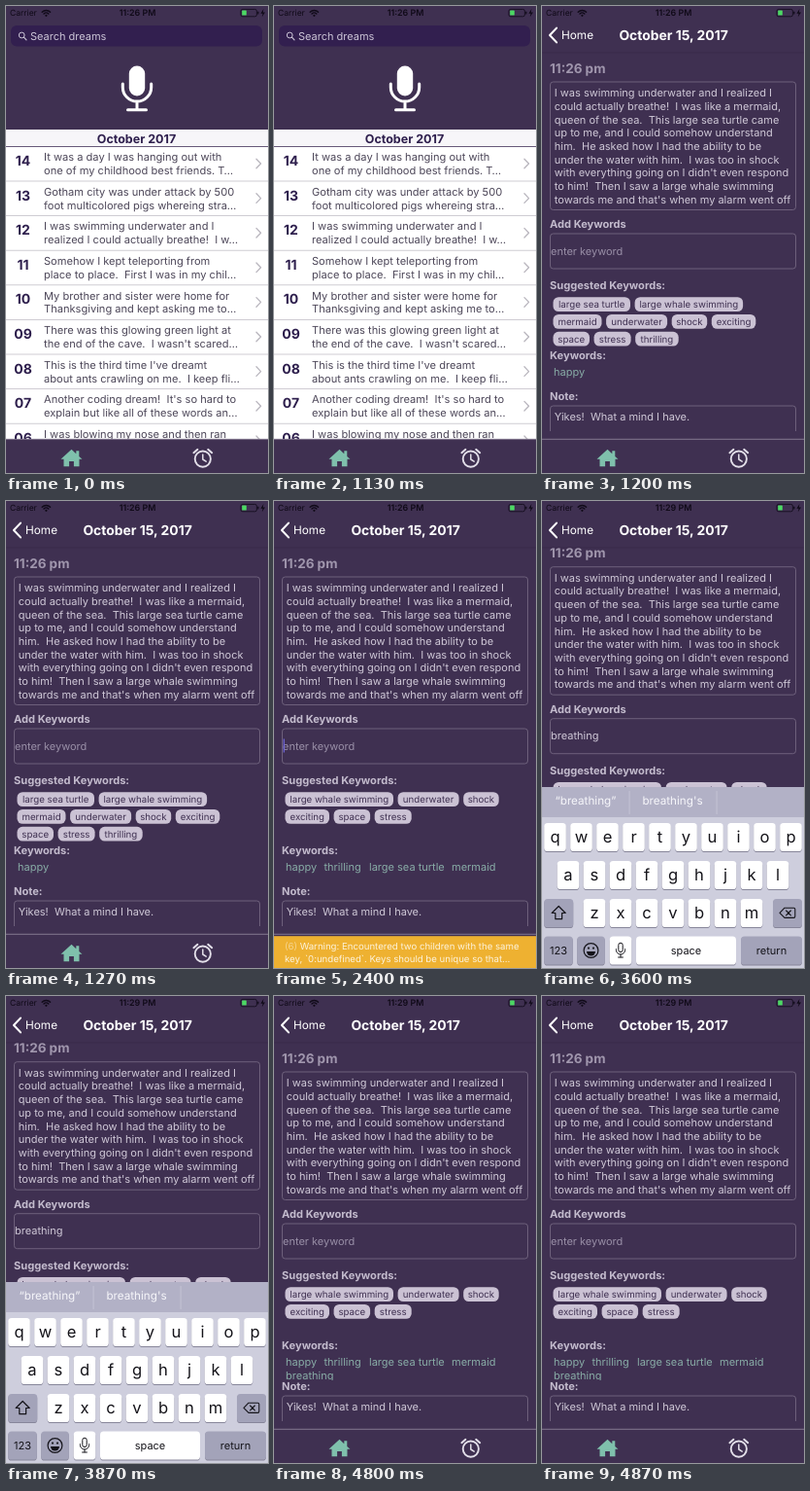
An HTML page for the animation above (5990 ms loop, 270 by 480 pixels).

```html
<!DOCTYPE html>
<html lang="en">
<head>
<meta charset="utf-8">
<title>Dream journal</title>
<style>
html, body { margin: 0; width: 100%; height: 100%; overflow: hidden; background: #3f3051; }
svg { display: block; width: 100%; height: 100%; }
text { font: 11px Inter, "Open Sans", sans-serif; white-space: pre; text-rendering: geometricPrecision; }
.mid { text-anchor: middle; }
.line { fill: none; stroke-linecap: round; stroke-linejoin: round; }
.shot { visibility: hidden; animation: show 5990ms step-end infinite; animation-delay: calc(var(--i) * 1200ms - 5990ms); }
@keyframes show {
  0% { visibility: visible; }
  20.0334%, 100% { visibility: hidden; }
}
.small { font-size: 8.5px; fill: #100a18; }
.clock { font-size: 8.9px; font-weight: 600; fill: #100a18; }
.search { fill: #cbc4d6; }
.month { font-size: 12.5px; font-weight: 700; fill: #2e1f4d; }
.day { font-size: 14px; font-weight: 700; fill: #2e1f4d; }
.entry { font-size: 11.1px; fill: #4d4759; }
.back { font-size: 11.8px; fill: #fff; }
.title { font-size: 13.9px; font-weight: 700; fill: #fff; }
.time { font-size: 13.5px; font-weight: 700; fill: #a096ad; }
.label { font-size: 11.1px; font-weight: 700; fill: #c3bbcd; }
.body { fill: #cfc8d7; }
.hint { fill: #998fa7; }
.chip { font-size: 9.7px; fill: #3f3051; }
.word { fill: #88aca6; }
.warn { font-size: 9.65px; fill: #fdf3dc; }
.key { font-size: 16.6px; fill: #15141a; }
.name { font-size: 11px; fill: #15141a; }
.guess { font-size: 11.7px; fill: #f6f6fa; }
</style>
</head>
<body>
<svg id="stage" viewBox="0 0 270 480">
  <defs>
    <clipPath id="listClip"><rect y="128" width="270" height="317"/></clipPath>
    <clipPath id="pageClip"><rect y="48" width="270" height="389"/></clipPath>
    <clipPath id="wordClip"><rect y="367" width="270" height="28"/></clipPath>
  </defs>
</svg>
<script>
const BG = '#3f3051', EDGE = '#796d87', INK = '#15141a', BLACK = '#100a18', GREY = '#a3a3b9';

const text = (cls, x, y, s) => `<text class="${cls}" x="${x}" y="${y}">${s}</text>`;
const rect = (x, y, w, h, fill, r = 0, more = '') =>
  `<rect x="${x}" y="${y}" width="${w}" height="${h}" rx="${r}" fill="${fill}" ${more}/>`;
const line = (d, color, w = 1) =>
  `<path class="line" d="${d}" stroke="${color}" stroke-width="${w}"/>`;
const frame = (y, h) => rect(8.5, y, 253, h, 'none', 3, `stroke="${EDGE}" stroke-width=".8"`);

const status = time => text('small', 4, 10, 'Carrier')
  + line('M37.2 6.2a6 6 0 0 1 8.4 0M39 8a3.5 3.5 0 0 1 4.8 0', BLACK, 1.4)
  + `<circle cx="41.4" cy="9.8" r="1.1" fill="${BLACK}"/>`
  + text('clock mid', 135.5, 10, time + ' PM')
  + rect(242, 3.4, 16.4, 7.4, 'none', 1.8, `stroke="${BLACK}" stroke-width=".8"`)
  + rect(243.2, 4.6, 4.6, 5, '#4cd964', .6)
  + rect(259.2, 5.6, 1.2, 3, BLACK, .6)
  + `<path d="M265.4 3l-3 4.8h2.2l-.8 3.4 3.2-4.8h-2.2z" fill="${BLACK}"/>`;

const tabs = () => rect(0, 445, 270, 35, BG) + rect(0, 444.8, 270, .9, '#8b8097')
  + '<path fill="#7fc0ac" d="M67.5 455.8l4.8 4.4v-3h3v5.7l3.2 2.9h-3v7.4h-5.6v-5.2h-4.8v5.2h-5.6v-7.4h-3z"/>'
  + '<circle cx="202.8" cy="465.6" r="8.1" fill="none" stroke="#e3dfe9" stroke-width="1.9"/>'
  + line('M202.8 461v5l3.4 2.2', '#e3dfe9', 1.5)
  + line('M193.4 459.2l4-3.4M212.2 459.2l-4-3.4', '#e3dfe9', 2);

const entries = [
  ['14', 'It was a day I was hanging out with', 'one of my childhood best friends. T…'],
  ['13', 'Gotham city was under attack by 500', 'foot multicolored pigs whereing stra…'],
  ['12', 'I was swimming underwater and I', 'realized I could actually breathe!  I w…'],
  ['11', 'Somehow I kept teleporting from', 'place to place.  First I was in my chil…'],
  ['10', 'My brother and sister were home for', 'Thanksgiving and kept asking me to…'],
  ['09', 'There was this glowing green light at', "the end of the cave.  I wasn't scared…"],
  ['08', "This is the third time I've dreamt", 'about ants crawling on me.  I keep fli…'],
  ['07', "Another coding dream!  It's so hard to", 'explain but like all of these words an…'],
  ['06', 'I was blowing my nose and then ran', '']
];

const row = ([day, a, b], i) => `<g transform="translate(0 ${i * 35.6})">`
  + text('day mid', 17.5, 164, day) + text('entry', 39, 159.2, a) + text('entry', 39, 173, b)
  + line('M258 157.2l4.6 4.8-4.6 4.8', '#b9b6be', 1.3)
  + rect(0, 179.6, 270, .8, '#c3c0c8') + '</g>';

const home = () => rect(0, 0, 270, 480, BG) + status('11:26')
  + rect(5, 20, 259, 21.5, '#321f4f', 6)
  + '<circle cx="16.2" cy="30" r="2.9" fill="none" stroke="#cbc4d6"/>'
  + line('M18.4 32.2l2.6 2.6', '#cbc4d6', 1.2)
  + text('search', 25, 34.6, 'Search dreams')
  + rect(126.8, 61.5, 16.4, 31, '#fff', 8.2)
  + line('M120.3 80v3.4a14.7 14.7 0 0 0 29.4 0V80M135 98.5v7.5M125.5 106.7h19', '#fff', 3)
  + rect(0, 127, 270, 318, '#fff') + rect(0, 127.5, 270, 17, '#f7f6f9')
  + rect(0, 144, 270, .9, '#57496a')
  + text('month mid', 134.5, 140.8, 'October 2017')
  + `<g clip-path="url(#listClip)">${entries.map(row).join('')}</g>` + tabs();

const story = [
  'I was swimming underwater and I realized I',
  'could actually breathe!  I was like a mermaid,',
  'queen of the sea.  This large sea turtle came',
  'up to me, and I could somehow understand',
  'him.  He asked how I had the ability to be',
  'under the water with him.  I was too in shock',
  "with everything going on I didn't even respond",
  'to him!  Then I saw a large whale swimming',
  "towards me and that's when my alarm went off"
];

// Each chip: label and width; rows flow left to right.
const chipRow = (row, i) => {
  let x = 11.5, out = '';
  for (const [label, w] of row) {
    out += rect(x, 299.2 + i * 17.8, w, 14.8, '#cbc2d4', 5.5)
      + text('chip mid', x + w / 2, 310.1 + i * 17.8, label);
    x += w + 4.6;
  }
  return out;
};
const turtle = ['large sea turtle', 79.5], whale = ['large whale swimming', 111.5],
  mermaid = ['mermaid', 50], under = ['underwater', 63], shock = ['shock', 36.5],
  exciting = ['exciting', 45.5], space = ['space', 37.5], stress = ['stress', 38],
  thrilling = ['thrilling', 44.5];
const allChips = [[turtle, whale], [mermaid, under, shock, exciting], [space, stress, thrilling]];
const fewChips = [[whale, under, shock], [exciting, space, stress]];
const picked = [[12, 'happy'], [51.5, 'thrilling'], [98, 'large sea turtle'], [183, 'mermaid']];

const detail = ({ time = '11:26', chips = fewChips, words = picked, input = '', last = '', scroll = 0 }) =>
  rect(0, 0, 270, 480, BG)
  + `<g clip-path="url(#pageClip)"><g transform="translate(0 ${-scroll})">`
  + text('time', 8, 68.8, '11:26 pm')
  + frame(78, 131.5) + story.map((s, i) => text('body', 12.8, 93.1 + i * 13.7, s)).join('')
  + text('label', 8, 228.2, 'Add Keywords') + frame(234, 36)
  + (input ? text('body', 9, 255.6, input) : text('hint', 9, 255.6, 'enter keyword'))
  + text('label', 8, 291.4, 'Suggested Keywords:') + chips.map(chipRow).join('')
  + text('label', 8, 363, 'Keywords:')
  + '<g clip-path="url(#wordClip)">'
  + words.map(([x, s]) => text('word', x, 380, s)).join('') + text('word', 12, 394, last) + '</g>'
  + text('label', 8, 405.2, 'Note:') + frame(411, 40)
  + text('body', 12.8, 426, 'Yikes!  What a mind I have.')
  + '</g></g>'
  + rect(0, 47.6, 270, .7, '#352745')
  + status(time) + line('M15 22.6L8 30l7 7.4', '#fff', 2.1)
  + text('back', 20, 34.4, 'Home') + text('title mid', 135.6, 35.2, 'October 15, 2017')
  + tabs();

const warning = () => rect(9.6, 244.5, 1.3, 14, '#6f66d8')
  + rect(0, 447.2, 270, 32.8, '#eeb131')
  + text('warn', 11, 460.8, '<tspan fill-opacity=".55">(6)</tspan> Warning: Encountered two children with the same')
  + text('warn', 11, 474, 'key, `0:undefined`. Keys should be unique so that…');

const cap = (x, y, w, fill = '#fff') =>
  rect(x, y + 1, w, 29, '#87869a', 3.6) + rect(x, y, w, 29, fill, 3.6);
const letters = (s, x, y) => [...s].map((c, i) =>
  cap(x + i * 27 - 11.3, y, 22.6) + text('key mid', x + i * 27, y + 20, c)).join('');

const keyboard = () => rect(0, 294, 270, 186, '#cecedd') + rect(0, 294, 270, 31, '#b2b1c6')
  + rect(89.7, 298, .7, 24, '#cbcad9') + rect(179.7, 298, .7, 24, '#cbcad9')
  + text('guess mid', 45, 312, '“breathing”') + text('guess mid', 134.5, 312, "breathing's")
  + letters('qwertyuiop', 13.5, 331) + letters('asdfghjkl', 27, 370) + letters('zxcvbnm', 54, 409)
  + cap(2.2, 409, 30, GREY) + cap(238, 409, 30, GREY)
  + line('M17.2 416.5l7 7h-3.6v6.2h-6.8v-6.2h-3.6z', INK, 1.2)
  + line('M250 418.2h9.5q1.3 0 1.3 1.3v7.6q0 1.3-1.3 1.3H250l-5-5.1zM251.6 421l4.8 4.8M256.4 421l-4.8 4.8', INK, 1.1)
  + cap(2.2, 447.5, 29.6, GREY) + text('name mid', 17, 466, '123')
  + cap(36.2, 447.5, 28.6, GREY)
  + `<circle cx="50.5" cy="462" r="7.4" fill="none" stroke="${INK}" stroke-width="1.2"/>`
  + `<circle cx="48" cy="459.6" r="1.1" fill="${INK}"/><circle cx="53" cy="459.6" r="1.1" fill="${INK}"/>`
  + `<path d="M46 463h9a4.5 4.5 0 0 1-9 0z" fill="${INK}"/>`
  + cap(69.7, 447.5, 22.6) + rect(78.8, 454.2, 4.4, 9.4, 'none', 2.2, `stroke="${INK}"`)
  + line('M76.4 460.6v.8a4.6 4.6 0 0 0 9.2 0v-.8M81 466.2v2.6M78.6 469h4.8', INK, 1)
  + cap(97, 447.5, 103) + text('name mid', 148.5, 466, 'space')
  + cap(205, 447.5, 63, GREY) + text('name mid', 236.5, 466, 'return');

const shots = [
  home(),
  detail({ chips: allChips, words: picked.slice(0, 1) }),
  detail({}) + warning(),
  detail({ time: '11:29', input: 'breathing', scroll: 10.3 }) + keyboard(),
  detail({ time: '11:29', last: 'breathing' })
];

// Earlier shots lie on top, so the loop restarts with a clean cut.
document.getElementById('stage').insertAdjacentHTML('beforeend',
  shots.map((s, i) => `<g class="shot" style="--i:${i}">${s}</g>`).reverse().join(''));
</script>
</body>
</html>
```
